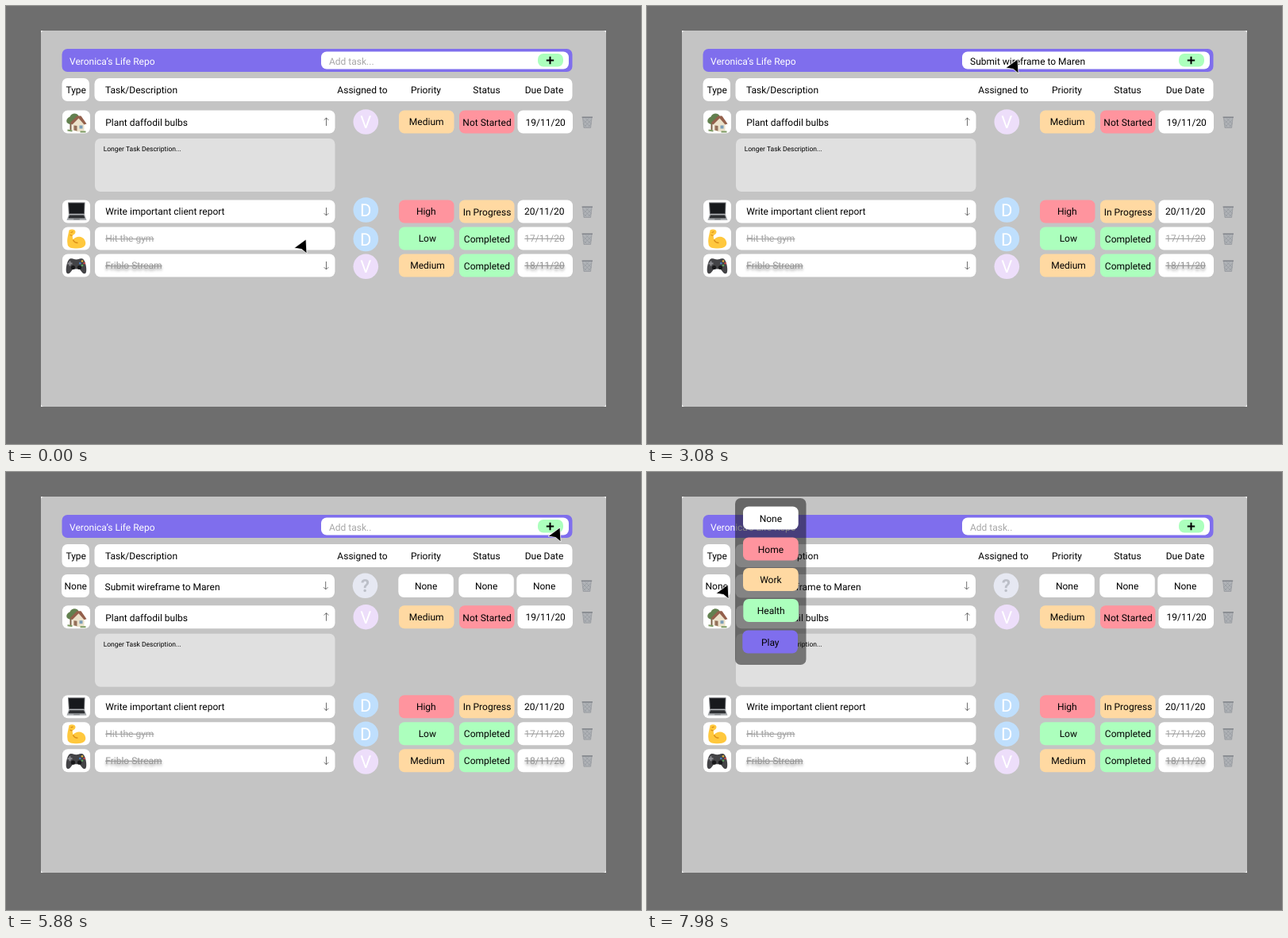
An HTML page for the animation above (8000 ms loop, 800 by 552 pixels).

```html
<!DOCTYPE html>
<html lang="en">
<head>
<meta charset="utf-8">
<title>Task list</title>
<style>
  html, body { margin: 0; width: 100%; height: 100%; overflow: hidden; background: #6e6e6e; }
  svg { display: block; width: 800px; height: 552px; }
  text { font: 12px Roboto, sans-serif; fill: #000; white-space: pre; text-rendering: geometricPrecision; }
  .mid { text-anchor: middle; }
  .done { fill: #a3a3a3; text-decoration: line-through; }
  .shadow { fill: #969696; filter: drop-shadow(0 3px 1.5px rgba(0, 0, 0, .3)); }
  .letter { font-size: 22px; fill: #fff; }
</style>
</head>
<body>
<svg id="stage" viewBox="0 0 800 552" xmlns="http://www.w3.org/2000/svg">
  <defs>
    <g id="house">
      <path d="M-7 10V0" stroke="#7d6045" stroke-width="2"/>
      <path d="M-12 0C-13-4-10-6-8-7C-6-12 1-12 3-8L-3 1C-6 3-10 3-12 0Z" fill="#62804f"/>
      <path d="M-5 1L3-6L10 1V11L2 12L-5 10Z" fill="#ece2cb"/>
      <path d="M-8 1L1-8L6-8L13 2L10 3L3-5L-5 3Z" fill="#94604c"/>
      <path d="M-3 4L1 4.500V11L-3 10Z" fill="#94705a"/>
      <path d="M4 4H8V8H4Z" fill="#7d9fb8"/>
      <path d="M-11 10L-5 11M5 12H12" stroke="#7c9a62" stroke-width="2"/>
    </g>
    <g id="laptop">
      <path d="M-10.500-12H11L10.500 3H-9.500Z" fill="#6b6d70"/>
      <path d="M-9.500-11H10L9.500 2H-8.500Z" fill="#17191c"/>
      <path d="M-9.500 3H10.500L13 10.500H-12Z" fill="#a9acaf"/>
      <path d="M-8.500 4H9.500L11 8H-10Z" fill="#2d2f32"/>
      <path d="M-3 8.500H4L4.500 10H-3.500Z" fill="#85888b"/>
    </g>
    <g id="arm">
      <path d="M-9-11C-6-13-1-12-1-9C-1-6-4-5-5-4L-4 1C0-4 8-4 11 2C14 9 8 12 1 12C-6 12-11 11-11 6C-12 0-10-5-9-11Z" fill="#ffc83d"/>
      <path d="M-4 1C-3 4-1 5 2 5M-5-4L-8-5M-4-9L-7-8" fill="none" stroke="#d98d18" stroke-width="1.300"/>
    </g>
    <g id="pad">
      <path d="M-8-9C-4-10-3-8 0-8S4-10 8-9C12-7 14 6 12 9C9 12 6 6 4 4H-4C-6 6-9 12-12 9C-14 6-12-7-8-9Z" fill="#434346"/>
      <path d="M-8-6V0M-11-3H-5" stroke="#8b8b90" stroke-width="2"/>
      <circle cx="-4" cy="2" r="2.600" fill="#18181a"/>
      <circle cx="4" cy="2" r="2.600" fill="#18181a"/>
      <circle cx="7.500" cy="-6" r="1.300" fill="#e3b23c"/>
      <circle cx="7.500" cy="-.5" r="1.300" fill="#58a35c"/>
      <circle cx="4.800" cy="-3.200" r="1.300" fill="#4a80c4"/>
      <circle cx="10.200" cy="-3.200" r="1.300" fill="#cc4a48"/>
    </g>
    <g id="trash">
      <path d="M-5.800-6H5.800L4.300 7H-4.300Z" fill="#afb2b6" stroke="#92969b" stroke-width=".7"/>
      <path d="M-5-3L4 6M-2-5L5 2M-5 2L-1 6M5-3L-4 6M2-5L-5 2M5 2L1 6" stroke="#959a9f" stroke-width=".7"/>
      <path d="M-6.700-6.300H6.700" stroke="#7e8288" stroke-width="1.400"/>
    </g>
    <path id="down" d="M0-5V5M-2.800 2.200L0 5L2.800 2.200" fill="none" stroke="#555" stroke-width=".85"/>
    <path id="up" d="M0 5V-5M-2.800-2.200L0-5L2.800-2.200" fill="none" stroke="#555" stroke-width=".85"/>
  </defs>
</svg>
<script>
const LOOP = 8000, STEP = 70;
const TYPE_START = 1890, TYPE_END = 2940, SUBMIT = 4900, MENU = 7350, SHIFT = 36.7;
const TASK = "Submit wireframe to Maren";
const WHITE = "#fff", ORANGE = "#ffd9a2", RED = "#ff949e", GREEN = "#acffbd", PURPLE = "#7f6eed";
const PINK = "#eddefa", BLUE = "#bfdffd";

const box = (x, y, w, h, fill, r = 7) =>
  `<rect x="${x}" y="${y}" width="${w}" height="${h}" rx="${r}" fill="${fill}"/>`;
const text = (x, y, s, cls = "", attrs = "") =>
  `<text x="${x}" y="${y}" class="${cls}" ${attrs}>${s}</text>`;
const mid = (x, y, s, cls = "") => text(x, y, s, "mid " + cls);
const use = (id, x, y) => `<use href="#${id}" x="${x}" y="${y}"/>`;
const avatar = (y, letter, fill, x = 453.3) =>
  `<circle cx="${x}" cy="${y}" r="15.8" fill="${fill}"/>` + mid(x, y + 8, letter, "letter");

function row(o) {
  const { y, base, cls = "" } = o;
  return box(71, y, 35, 29, WHITE) + use(o.icon, 88.5, y + 15) +
    box(112, y, 302.5, 29, WHITE) + text(125.2, base, o.title, cls) +
    (o.arrow ? use(o.arrow, 403.5, y + 14.5) : "") +
    avatar(o.faceY, o.face, o.face === "V" ? PINK : BLUE) +
    box(495, y, 69.5, 29, o.priority[1]) + mid(o.priority[2], o.priority[3], o.priority[0]) +
    box(571, y, 69.5, 29, o.status[1]) + mid(606, base + .3, o.status[0]) +
    box(644.5, y, 69.5, 29, WHITE) + mid(o.dateX, base - .3, o.date, cls) +
    use("trash", 732.3, y + 15);
}

const rows = [
  { y: 131.5, base: 151, icon: "house", title: "Plant daffodil bulbs", arrow: "up", face: "V", faceY: 146,
    priority: ["Medium", ORANGE, 529.7, 150.2], status: ["Not Started", RED], date: "19/11/20", dateX: 679.7 },
  { y: 244.5, base: 263.3, icon: "laptop", title: "Write important client report", arrow: "down", face: "D", faceY: 257,
    priority: ["High", RED, 529.3, 263], status: ["In Progress", ORANGE], date: "20/11/20", dateX: 678.3 },
  { y: 278.5, base: 297.3, icon: "arm", title: "Hit the gym", face: "D", faceY: 293.5, cls: "done",
    priority: ["Low", GREEN, 530.8, 297], status: ["Completed", GREEN], date: "17/11/20", dateX: 678.5 },
  { y: 312.5, base: 331.3, icon: "pad", title: "Friblo Stream", arrow: "down", face: "V", faceY: 328.3, cls: "done shadow",
    priority: ["Medium", ORANGE, 531, 331], status: ["Completed", GREEN], date: "18/11/20", dateX: 678.5 }
];

const header =
  box(44, 31, 712, 474, WHITE, 0) + box(44, 31, 712, 474, "#c4c4c4", 4) +
  box(70.5, 54, 643, 29, PURPLE) + text(80, 73.8, "Veronica’s Life Repo", "", 'style="fill:#fff"') +
  box(397, 57.5, 312, 22, WHITE) + text(407, 73.8, "", "", 'id="entry"') +
  box(670, 60, 32, 16.5, GREEN, 7) +
  `<circle id="ring" cx="686.5" cy="69" r="15" fill="${GREEN}" stroke="#579fc4" stroke-width="2"/>` +
  '<path d="M685.500 63.800V73.200M680.800 68.500H690.200" stroke="#000" stroke-width="2"/>' +
  box(70.5, 91, 34.5, 29, WHITE) + box(111.5, 91, 602, 29, WHITE) +
  mid(88.2, 110.3, "Type") + text(125, 110.3, "Task/Description") + mid(449, 110.3, "Assigned to") +
  mid(529, 110.3, "Priority") + mid(605.5, 110.3, "Status") + mid(678, 110.3, "Due Date");

const newRow =
  box(70, 129, 35, 29, WHITE) + mid(87.7, 148, "None") +
  box(111.5, 129, 302.5, 29.5, WHITE) + text(124.5, 149, TASK) + use("down", 402.7, 143) +
  `<circle cx="452.5" cy="143.300" r="15.800" fill="#e6e8f2"/>` +
  text(452.5, 151, "?", "mid", 'style="font-size:22px;font-weight:700;fill:#bcbfc8"') +
  [494.3, 570.3, 643.3].map(x => box(x, 128.5, 69.5, 29.5, WHITE) + mid(x + 34.8, 148, "None")).join("") +
  use("trash", 731.5, 143.5);

const list = rows.map(row).join("") +
  box(112, 167, 302.5, 67, "#e0e0e0") +
  text(122.7, 183.3, "Longer Task Description...", "", 'style="font-size:8.5px"');

const options = [["None", WHITE, 121, 43.5], ["Home", RED, 121, 82.5], ["Work", ORANGE, 121, 121],
  ["Health", GREEN, 121.3, 160], ["Play", PURPLE, 120.3, 199.5]];
const menu = box(111, 33, 89.5, 210, "rgba(20,20,20,.52)") +
  options.map(([name, fill, x, y]) => box(x, y, 69.7, 29, fill) + mid(x + 34.9, y + 19, name)).join("");

const stage = document.getElementById("stage");
stage.insertAdjacentHTML("beforeend",
  `${header}<g id="newRow">${newRow}</g><g id="list">${list}</g><g id="menu">${menu}</g>` +
  '<path id="cursor" d="M0 0L-15 11L-5.500 12.500L1 18Z" stroke-linejoin="miter"/>');
const [entry, ring, added, listGroup, menuGroup, cursor] =
  ["entry", "ring", "newRow", "list", "menu", "cursor"].map(id => document.getElementById(id));

// time, x, y of the cursor tip
const path = [[0, 378, 294], [1050, 378, 294], [1785, 467, 67], [3780, 467, 67], [4480, 694, 69],
  [4620, 694, 69], [4760, 698, 70], [5880, 698, 70], [6720, 141, 131], [7140, 102, 142], [LOOP, 102, 142]];
const ease = u => (1 - Math.cos(Math.PI * u)) / 2;

function cursorAt(t) {
  const i = path.findIndex(p => p[0] > t);
  const [t0, x0, y0] = path[i - 1], [t1, x1, y1] = path[i];
  const u = ease((t - t0) / (t1 - t0));
  return [x0 + (x1 - x0) * u, y0 + (y1 - y0) * u];
}

function entryAt(t) {
  if (t < TYPE_START) return "Add task...";
  if (t >= SUBMIT) return "Add task..";
  const u = Math.min(1, (t - TYPE_START) / (TYPE_END - TYPE_START));
  return TASK.slice(0, Math.round(u * TASK.length));
}

const show = (el, on) => el.setAttribute("visibility", on ? "visible" : "hidden");

function draw() {
  const t = Math.floor((performance.now() % LOOP) / STEP) * STEP;
  const submitted = t >= SUBMIT;
  const pressed = t >= 4480 && t < 4760;
  entry.textContent = entryAt(t);
  entry.style.fill = t < TYPE_START || submitted ? "#a6a6a6" : "#000";
  show(ring, t >= 4760 && t < 5600);
  show(added, submitted);
  show(menuGroup, t >= MENU);
  listGroup.setAttribute("transform", `translate(0 ${submitted ? SHIFT : 0})`);
  const [x, y] = cursorAt(t);
  cursor.setAttribute("transform", `translate(${x} ${y}) scale(${pressed ? 1.15 : 1})`);
  cursor.setAttribute("fill", pressed ? "#fff" : "#000");
  cursor.setAttribute("stroke", pressed ? "#000" : "#fff");
  cursor.setAttribute("stroke-width", pressed ? 1.2 : .8);
  requestAnimationFrame(draw);
}
draw();
</script>
</body>
</html>
```
